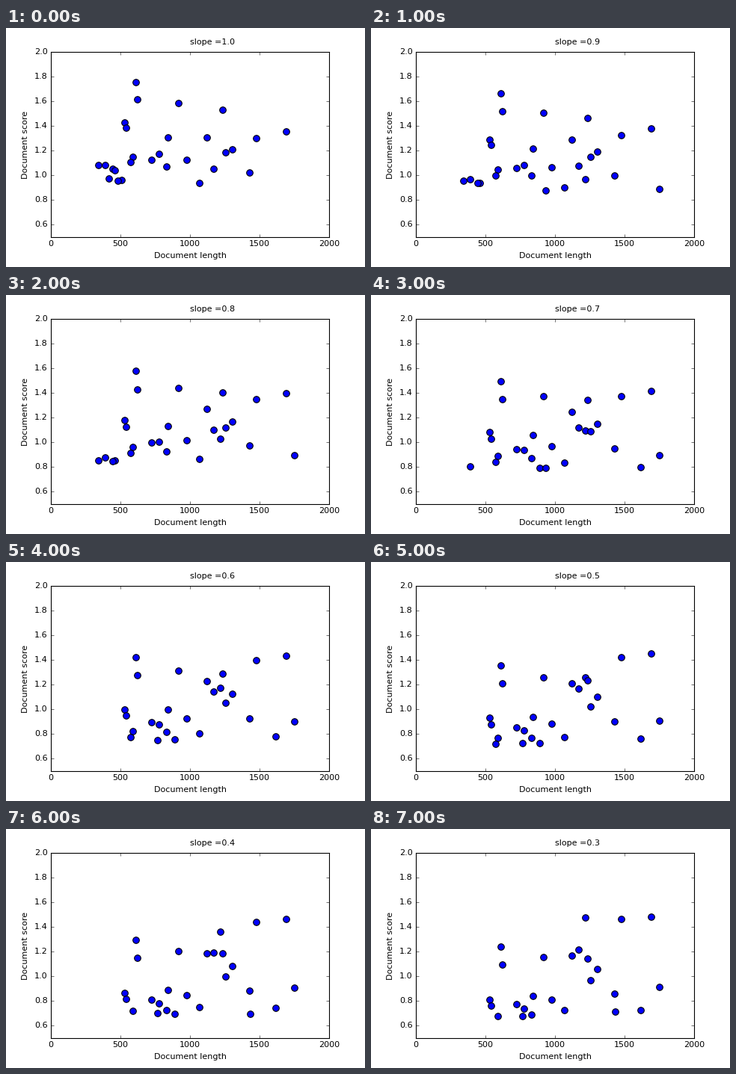
A matplotlib script for the animation above (8000 ms loop, 480 px wide and 320 px high).

```python
import matplotlib.pyplot as plt
import numpy as np
from matplotlib.animation import FuncAnimation
from matplotlib.markers import MarkerStyle
from matplotlib.transforms import Affine2D

plt.style.use("classic")
plt.rcParams.update({
    "font.family": "DejaVu Sans",
    "font.size": 10,
    "figure.facecolor": "white",
    "savefig.dpi": "figure",
})

W, H, DPI = 480, 320, 80
STEPS = 8
LAST = STEPS - 1
BEND = .0003  # slight common curvature of the inverse scores

# document length, score at the first slope, score at the last slope
DOCS = [
    (344, 1.08, .555), (392, 1.08, .594), (420, .97, .50), (445, 1.05, .56),
    (462, 1.04, .583), (484, .955, .50), (510, .96, .50), (531, 1.425, .81),
    (542, 1.385, .76), (575, 1.105, .629), (590, 1.15, .675), (612, 1.755, 1.235),
    (623, 1.615, 1.095), (725, 1.125, .773), (768, .877, .675), (780, 1.17, .735),
    (832, 1.07, .688), (843, 1.305, .838), (893, .912, .666), (918, 1.58, 1.155),
    (935, .926, .653), (977, 1.12, .808), (1068, .935, .723), (1122, 1.305, 1.165),
    (1170, 1.05, 1.215), (1218, .912, 1.475), (1236, 1.53, 1.14), (1258, 1.185, .965),
    (1305, 1.21, 1.058), (1430, 1.02, .857), (1437, .62, .71), (1478, 1.30, 1.46),
    (1620, .855, .725), (1692, 1.355, 1.48), (1754, .88, .91),
]
length, first, last = np.array(DOCS).T


def retrieved(step):
    """Best documents at one slope, highest score first."""
    t = step / LAST
    norm = (1 - t) / first + t / last + BEND * step * (step - LAST)
    best = np.argsort(norm)[:round(28 - .4 * step)]
    return np.column_stack([length[best], 1 / norm[best]])


fig = plt.figure(figsize=(W / DPI, H / DPI), dpi=DPI)
ax = fig.add_axes([.125, .125, .775, .775])
ax.set_xlim(0, 2000)
ax.set_ylim(.5, 2.0)
ax.set_xticks(range(0, 2001, 500))
ax.set_yticks(np.arange(.6, 2.01, .2))
ax.set_xlabel("Document length")
ax.set_ylabel("Document score", labelpad=5.9)

# circles sit on pixel centres, half a pixel up and left
dot = MarkerStyle("o").transformed(Affine2D().translate(-.058, .058))
dots = ax.scatter([], [], s=60, c="#0000ff", marker=dot,
                  edgecolors="black", linewidths=1)
title = fig.text(246 / W, 1 - 22.5 / H, "", ha="left", va="baseline")


def draw(step):
    dots.set_offsets(retrieved(step))
    title.set_text(f"slope ={1 - step / 10:.1f}")
    return dots, title


anim = FuncAnimation(fig, draw, frames=STEPS, interval=1000, repeat=True)
plt.show()
```
